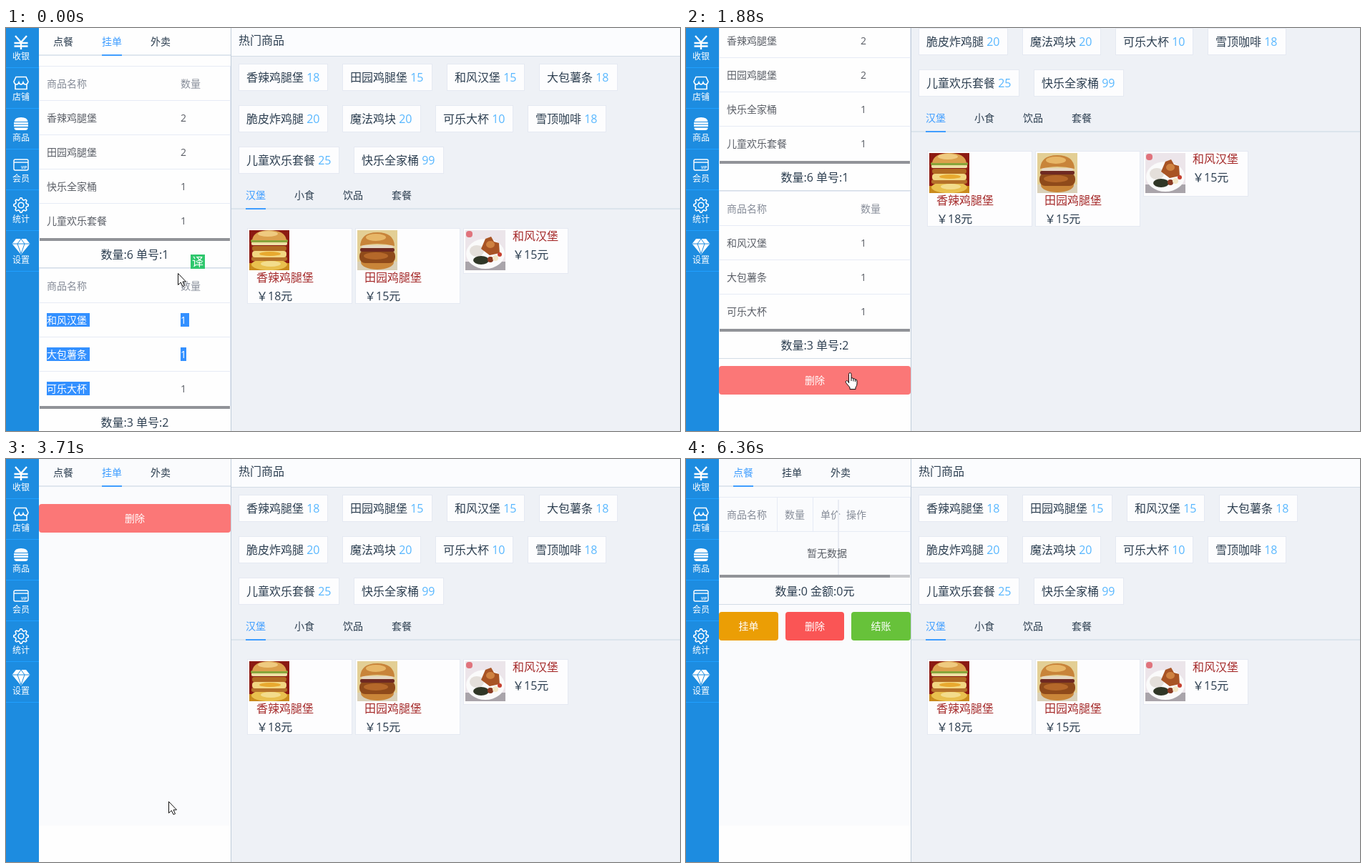
These frames come from a looping animation (942x564 px, 6610 ms). An HTML page:

```html
<!DOCTYPE html>
<html lang="zh-CN">
<head>
<meta charset="utf-8">
<title>收银</title>
<style>
  html, body { margin: 0; width: 100%; height: 100%; overflow: hidden; background: #eef1f6; }
  svg { display: block; font-family: "Open Sans", "Noto Sans CJK SC", "Noto Sans CJK", sans-serif; }
</style>
</head>
<body>
<svg id="stage" width="942" height="564" viewBox="0 0 942 564"></svg>
<script>
const LOOP = 6610;
const INK = '#2c3e50', BLUE = '#409eff', LINE = '#e6ebf5', EDGE = '#d3dce6', RED = '#fa5555', HOVER = '#fb7777';
const PAPER = '#fdfdfe';

const rect = (x, y, w, h, fill, more = '') =>
  `<rect x="${x}" y="${y}" width="${w}" height="${h}" fill="${fill}" ${more}/>`;
const path = (d, fill, more = '') => `<path d="${d}" fill="${fill}" ${more}/>`;
const ellipse = (x, y, rx, ry, fill) => `<ellipse cx="${x}" cy="${y}" rx="${rx}" ry="${ry}" fill="${fill}"/>`;
const group = (x, y, body) => `<g transform="translate(${x} ${y})">${body}</g>`;
// y is the vertical middle of the line; baselines sit on whole pixels
const text = (x, y, str, size = 16, fill = INK, more = '') =>
  `<text x="${x}" y="${Math.round(y + size * .37)}" font-size="${size}" fill="${fill}" ${more}>${str}</text>`;
const centered = (x, y, str, size, fill, more = '') =>
  text(x, y, str, size, fill, 'text-anchor="middle" ' + more);
const button = (x, y, w, label, fill) =>
  rect(x, y, w, 40, fill, 'rx="4"') + centered(x + w / 2, y + 20, label, 14, '#fff', 'font-weight="500"');

// ---- sidebar ----
const gear = () => {
  let d = '';
  for (let i = 0; i < 32; i++) {
    const a = (i - .5) * Math.PI / 16, r = i % 4 < 2 ? 10.2 : 7.8;
    d += (i ? 'L' : 'M') + (r * Math.cos(a)).toFixed(1) + ' ' + (r * Math.sin(a)).toFixed(1);
  }
  return path(d + 'z', 'none') + '<circle r="3.8" fill="none"/>';
};
const icons = [
  path('M-8-9L0 0 8-9M-9.5 1H9.5M-9.5 5.5H9.5M0 0V10', 'none', 'stroke-width="2.4"'),
  path('M-7-8.5H7L10-2Q9 2 6 2 4 2 3-1 2 2 0 2-2 2-3-1-4 2-6 2-9 2-10-2zM-8 2V8.5H8V2', 'none'),
  path('M-9.5-3Q-9-9 0-9 9-9 9.5-3zM-9.5 5.5H9.5Q9.5 9 6 9H-6Q-9.5 9-9.5 5.5z', '#fff', 'stroke="none"') +
    path('M-10-.8H10M-10 2.8H10', 'none', 'stroke-width="2.4"'),
  '<rect x="-10" y="-7" width="20" height="15" rx="2" fill="none" stroke-width="1.4"/>' +
    path('M-10-3H10', 'none', 'stroke-width="1.4"') +
    '<text x="0" y="5.5" font-size="5" font-weight="700" fill="#fff" stroke="none">VIP</text>',
  gear(),
  path('M-7-10H7L12.5-3 0 12-12.5-3z', '#fff', 'stroke="none"') +
    path('M-12-3H12M-5-3L0 11 5-3 0-10z', 'none', 'stroke="#1d8ce0" stroke-width="1"')
];
const sidebar = rect(0, 0, 46, 564, '#1d8ce0') + ['收银', '店铺', '商品', '会员', '统计', '设置'].map((name, i) =>
  group(21, 20 + 57 * i, `<g stroke="#fff" stroke-width="1.6">${icons[i]}</g>` +
    centered(0, 20, name, 12, '#fff', 'font-weight="500"')) +
  rect(0, 55 + 57 * i, 46, 1, '#20a0ff')).join('');

// ---- catalogue ----
const hotRows = [
  [['香辣鸡腿堡', 18], ['田园鸡腿堡', 15], ['和风汉堡', 15], ['大包薯条', 18]],
  [['脆皮炸鸡腿', 20], ['魔法鸡块', 20], ['可乐大杯', 10], ['雪顶咖啡', 18]],
  [['儿童欢乐套餐', 25], ['快乐全家桶', 99]]
];
const hotItems = hotRows.map((row, r) => {
  let x = 325;
  return row.map(([name, price]) => {
    const end = x + name.length * 16 + 45.4, left = Math.round(x), y = 50 + 58 * r;
    x = end + 20;
    return rect(left + .5, y + .5, Math.round(end) - left - 1, 37, PAPER, 'stroke="#e5e9f2"') +
      text(left + 11, y + 19, `${name} <tspan fill="#58b7ff">${price}</tspan>`);
  }).join('');
}).join('');

// Food pictures as flat shapes, 56 px square
const tallBurger = rect(0, 0, 56, 56, '#8c1a12') + rect(0, 46, 56, 10, '#c98a1c') +
  ellipse(28, 48, 25, 8, '#e9c04e') + ellipse(30, 47, 14, 4, '#f3dd8c') +
  rect(3, 37, 50, 6, '#b5722a', 'rx="3"') + rect(4, 29, 48, 9, '#f2d681', 'rx="4"') +
  ellipse(29, 33, 15, 3, '#e8a92e') + rect(4, 22, 48, 7, '#b06a22', 'rx="3"') +
  rect(3, 16, 50, 5, '#eee0a4', 'rx="2"') + rect(2, 13, 52, 4, '#87a53a', 'rx="2"') +
  path('M4 14Q6 0 28 0 50 0 52 14z', '#dba04c') + ellipse(26, 5, 14, 4, '#efca80');
const roundBurger = rect(0, 0, 56, 56, '#e3cf95') + rect(0, 44, 56, 12, '#d9d0b8') +
  ellipse(28, 45, 23, 10, '#c98538') + rect(3, 28, 50, 18, '#8f4a1a', 'rx="8"') +
  ellipse(26, 36, 17, 5, '#b5682a') + rect(4, 25, 48, 5, '#6f2a22', 'rx="2"') +
  rect(6, 21, 44, 4, '#e6d8c4', 'rx="2"') +
  path('M4 22Q5 3 28 3 51 3 52 22 28 16 4 22z', '#c8843a') + ellipse(26, 10, 14, 5, '#e7b667');
const plate = rect(0, 0, 56, 56, '#ece5ea') + rect(0, 44, 56, 12, '#a9a4aa') + rect(1, 1, 9, 9, '#e0737c', 'rx="4"') +
  ellipse(28, 33, 27, 21, '#fafafa') + ellipse(16, 29, 10, 8, '#e4dfda') +
  path('M22 26L28 12 36 9 40 16 47 18 48 32 34 35z', '#a85424') + ellipse(35, 20, 6, 5, '#cf8240') +
  ellipse(22, 42, 11, 6, '#2f3626') + ellipse(35, 41, 4, 4, '#8a3a22') +
  ellipse(42, 39, 4, 4, '#f3e6c4') + ellipse(48, 34, 3, 3, '#c7402f');

const card = (x, h, picture, tx, ty, name, price) =>
  rect(x + .5, 280.5, 146, h, PAPER, 'stroke="#e5e9f2"') + group(x + 3, 283, picture) +
  text(tx, ty, name, 16, '#a52a2a') + text(tx, ty + 26, `￥${price}元`);

const catalog = rect(315, 0, 627, 39, '#fbfcfe') + rect(315, 39, 627, 1, EDGE) + text(325, 17, '热门商品') + hotItems +
  ['汉堡', '小食', '饮品', '套餐'].map((name, i) => text(335 + 68 * i, 234, name, 14, i ? INK : BLUE)).join('') +
  rect(315, 252, 627, 2, '#dbe4ec') + rect(335, 252, 28, 2, BLUE) +
  card(337, 105, tallBurger, 350, 349, '香辣鸡腿堡', 18) +
  card(488, 105, roundBurger, 501, 349, '田园鸡腿堡', 15) +
  card(639, 63, plate, 708, 291, '和风汉堡', 15);

// ---- left panel ----
const HEAD = '#878d99', CELL = '#5a5e66';
const sides = (top, bottom) => [46, 313].map(x => rect(x, top, 1, bottom - top, LINE)).join('');
const heldOrder = (top, no, items, count) => {
  const bar = top + 48 * (items.length + 1) + 1;
  const row = (y, a, b, fill) => rect(46, y, 268, 1, LINE) + text(57, y + 24.5, a, 14, fill) + text(244, y + 24.5, b, 14, fill);
  return row(top, '商品名称', '数量', HEAD) +
    items.map(([name, n], i) => row(top + 48 * (i + 1), name, n, CELL)).join('') + sides(top, bar) +
    rect(47, bar, 266, 4, '#919398') + centered(180, bar + 23, `数量:${count} 单号:${no}`) +
    rect(46, bar + 41, 268, 1, EDGE);
};
const orders =
  heldOrder(53, 1, [['香辣鸡腿堡', 2], ['田园鸡腿堡', 2], ['快乐全家桶', 1], ['儿童欢乐套餐', 1]], 6) +
  heldOrder(336, 2, [['和风汉堡', 1], ['大包薯条', 1], ['可乐大杯', 1]], 3);

const marked = (x, y, w, str) => rect(x, y - 9, w, 19, '#3390ff') + text(x, y + .5, str, 14, '#fff');
const selection = ['和风汉堡', '大包薯条', '可乐大杯'].map((name, i) => marked(57, 408 + 48 * i, 60, name)).join('') +
  marked(244, 408, 12, 1) + marked(244, 456, 8, 1) +
  rect(258, 317, 20, 20, '#2fc76d') + text(260, 327, '译', 16, '#fff');

const emptyCart = rect(46, 53, 268, 1, LINE) + rect(46, 101, 268, 1, LINE) + sides(53, 162) +
  [127, 177].map(x => rect(x, 54, 1, 48, LINE)).join('') +
  [['商品名称', 57], ['数量', 138], ['单价', 188], ['操作', 224]].map(([s, x]) => text(x, 77.5, s, 14, HEAD)).join('') +
  rect(212, 57, 2, 105, '#e9ecf3') + centered(197, 132, '暂无数据', 14, CELL) +
  rect(47, 162, 266, 4, '#c8c9cc') + rect(47, 162, 238, 4, '#919398') +
  centered(180, 185, '数量:0 金额:0元') + rect(46, 203, 268, 1, EDGE) +
  button(46, 214, 83, '挂单', '#eb9e05') + button(139, 214, 82, '删除', RED) + button(231, 214, 83, '结账', '#67c23a');

// ---- timeline: [start, value...] ----
const scrolls = [[0, 0], [1080, 103], [1330, 108], [3710, 0]];
const deleteFills = [[0, RED], [1610, '#fb6666'], [1880, HOVER], [2660, '#e14d4d'], [3190, HOVER]];
const underlines = [[0, 134], [5010, 127], [5280, 66]];
const pointers = [
  [0, 'arrow', 240, 343], [280, 'arrow', 234, 389], [560, 'arrow', 182, 412], [810, 'arrow', 207, 442],
  [1080, 'beam', 219, 441], [1330, 'arrow', 228, 447], [1610, 'hand', 222, 482], [3190, 'arrow', 227, 482],
  [3710, 'arrow', 227, 479], [3960, 'arrow', 248, 344], [4210, 'arrow', 261, 123], [4480, 'arrow', 151, 48],
  [4730, 'hand', 75, 22], [5560, 'arrow', 402, 246], [5840, 'arrow', 734, 496], [6090, 'arrow', 859, 543],
  [6360, 'none', 0, 0]
];
const pick = (list, t) => list.filter(e => e[0] <= t).pop().slice(1);

const shapes = {
  arrow: path('M.5.5V16.5L4.3 13 7 18.5 9.5 17.5 7 12H11.5z', '#fff', 'stroke="#111"'),
  beam: path('M0 .5H3.5L4.5 1.5 5.5.5H9M4.5 1.5V16.5M0 17.5H3.5L4.5 16.5 5.5 17.5H9M2.5 10H6.5', 'none', 'stroke="#222"'),
  hand: path('M5.5 15V2.5Q5.5.6 7.2.6 9 .6 9 2.5V8Q11.5 7 12 9 14 8 14.7 10 17 9.5 17 12V16Q17 19 15 21V23.5H7V21L1.5 14.5Q.5 12 2.5 11.5 4 11.5 5.5 14M9 8V12M12 9V12.5M14.7 10V13', '#fff', 'stroke="#111" stroke-linejoin="round"'),
  none: ''
};

function draw(t) {
  const [shape, x, y] = pick(pointers, t);
  const [fill] = pick(deleteFills, t);
  const onCart = t >= 5010;
  const activeTabs = onCart ? [1, 0, 0] : [t >= 4730, 1, 0];
  const tabs = ['点餐', '挂单', '外卖'].map((name, i) => text(66 + 68 * i, 19, name, 14, activeTabs[i] ? BLUE : INK)).join('') +
    rect(46, 37, 268, 2, '#dfe6ee') + rect(pick(underlines, t)[0], 37, 28, 2, BLUE);
  let panel;
  if (onCart) panel = emptyCart;
  else if (t >= 3190) panel = button(46, 63, 268, '删除', fill);
  else panel = orders + button(46, 581, 268, '删除', fill);
  if (t < 560) panel += selection;
  if (t >= 1080 && t < 1330) panel += rect(231, 433, 3, 96, '#e6ebf5');

  return rect(0, 0, 942, 564, '#eef1f6') + rect(46, 0, 268, 564, '#fefefe') +
    (t >= 3190 ? rect(46, 0, 268, 513, '#fafbfd') : '') +
    group(0, -pick(scrolls, t)[0], tabs + panel + catalog) +
    rect(314, 0, 1, 564, '#c0ccda') + sidebar + group(x, y, shapes[shape]);
}

const stage = document.getElementById('stage');
const start = performance.now();
let shown = '';
function tick() {
  const picture = draw((performance.now() - start) % LOOP);
  if (picture !== shown) stage.innerHTML = shown = picture;
  requestAnimationFrame(tick);
}
tick();
</script>
</body>
</html>
```
